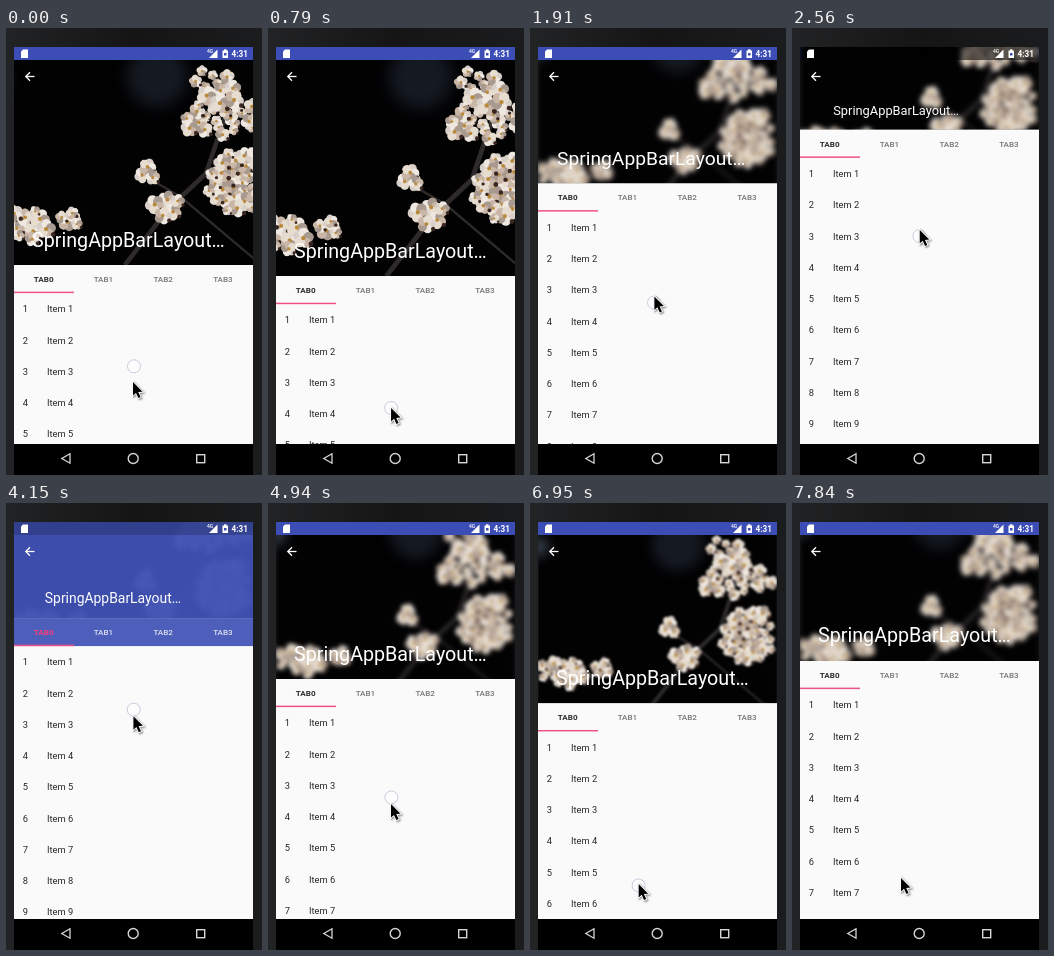
Animation of 256 by 447 pixels, one loop 8000 ms. Source, as an HTML page with a canvas:

```html
<!DOCTYPE html>
<html lang="en">
<head>
<meta charset="utf-8">
<title>Spring app bar</title>
<style>
  html, body { margin: 0; width: 100%; height: 100%; overflow: hidden; background: #111; }
  canvas { display: block; width: 256px; height: 447px; }
</style>
</head>
<body>
<canvas id="stage"></canvas>
<script>
const LOOP = 8000, RELEASE = 7520;
const LEFT = 8, RIGHT = 247, WIDTH = RIGHT - LEFT;
const STATUS_TOP = 19, BAR_TOP = 32, NAV_TOP = 416;
const REST = 158, COLLAPSED = 65.5;   // bottom edge of the header
const PHOTO_H = 177;
const BLUE = [60, 78, 182];

// Drag gestures: [time, header bottom] and [time, x, y]
const headerKeys = [[0, 237], [290, 249], [780, 249], [3000, COLLAPSED], [3690, COLLAPSED],
  [4550, REST], [4940, 176], [5900, 207], [6420, 207], [7220, 197]];
const pointerKeys = [[-60, 128, 338], [0, 127, 354], [290, 124, 380], [820, 123, 380], [1260, 121, 335],
  [3000, 130, 157], [3690, 130, 162], [4940, 123, 301], [5880, 108, 393], [6420, 108, 393], [7220, 109, 375]];

const clamp = v => Math.max(0, Math.min(1, v));
const lerp = (a, b, k) => a + (b - a) * k;
const progress = (t, start, length) => clamp((t - start) / length);
const easeOut = p => 1 - (1 - p) ** 2;
const mix = (a, b, k) => `rgb(${a.map((v, i) => Math.round(lerp(v, b[i], k))).join()})`;

function track(keys, t) {
  const i = keys.findIndex(key => key[0] > t);
  if (i < 0) return keys[keys.length - 1].slice(1);
  const from = keys[Math.max(0, i - 1)], to = keys[i];
  const k = progress(t, from[0], to[0] - from[0] || 1);
  return to.slice(1).map((v, n) => lerp(from[n + 1], v, k));
}

const headerBottom = t => lerp(track(headerKeys, t)[0], REST, easeOut(progress(t, RELEASE, 320)));
const scrimAlpha = t => easeOut(progress(t, 2570, 600)) * (1 - progress(t, 4020, 600) ** 2);

function randomizer(seed) {
  return () => (seed = seed * 16807 % 2147483647) / 2147483647;
}

const canvas = document.getElementById('stage');
const ctx = canvas.getContext('2d');
const dpr = window.devicePixelRatio || 1;
canvas.width = 256 * dpr;
canvas.height = 447 * dpr;

function box(color, x, y, w, h) {
  ctx.fillStyle = color;
  ctx.fillRect(x, y, w, h);
}

function disc(c, color, x, y, r) {
  c.fillStyle = color;
  c.beginPath();
  c.arc(x, y, r, 0, 7);
  c.fill();
}

function line(c, color, width, points, close) {
  c.strokeStyle = color;
  c.lineWidth = width;
  c.beginPath();
  points.forEach(([x, y]) => c.lineTo(x, y));
  if (close) c.closePath();
  c.stroke();
}

function shape(color, points) {
  ctx.fillStyle = color;
  ctx.beginPath();
  points.forEach(([x, y]) => ctx.lineTo(x, y));
  ctx.fill();
}

function label(text, x, y, size, color, weight = 400, align = 'left') {
  ctx.font = `${weight} ${size}px Roboto, sans-serif`;
  ctx.textAlign = align;
  ctx.fillStyle = color;
  ctx.fillText(text, x, y + size * 0.355);
}

function paintBlossom(c, x, y, r, random) {
  const petals = ['#d8cfc8', '#efe8e0', '#a99a90', '#c9b6a6', '#e6dccf'];
  const turn = random() * 6;
  petals.forEach((color, i) => {
    const a = turn + i * Math.PI * 0.4;
    disc(c, color, x + Math.cos(a) * r * 0.55, y + Math.sin(a) * r * 0.55, r * 0.55);
  });
  disc(c, '#b98a3c', x, y, r * 0.22);
  disc(c, '#3a2620', x + r * 0.8, y + r * 0.6, r * 0.25);
}

// Soft clusters of blossoms on black
function paintPhoto() {
  const photo = document.createElement('canvas');
  photo.width = WIDTH * 2;
  photo.height = PHOTO_H * 2;
  const c = photo.getContext('2d');
  const random = randomizer(77);
  c.scale(2, 2);
  c.fillStyle = '#020203';
  c.fillRect(0, 0, WIDTH, PHOTO_H);
  c.filter = 'blur(12px)';
  disc(c, '#151a22', 140, 14, 26);
  disc(c, '#3a4450', 0, 16, 10);
  c.filter = 'none';
  line(c, '#2e2a2a', 4, [[112, 177], [150, 128], [182, 98], [200, 45]]);
  line(c, '#2e2a2a', 2, [[122, 96], [160, 118], [230, 177]]);
  // x, y, half width, half height, count
  const clusters = [[187, 20, 20, 13, 9], [198, 50, 38, 16, 24], [210, 106, 27, 28, 32],
    [131, 97, 9, 6, 4], [148, 126, 13, 9, 7], [25, 142, 25, 14, 13], [66, 137, 9, 7, 5]];
  for (const [x, y, w, h, count] of clusters) {
    for (let i = 0; i < count; i++) {
      const a = i * 2.4, d = Math.sqrt((i + 0.5) / count);
      paintBlossom(c, x + Math.cos(a) * d * w, y + Math.sin(a) * d * h, 4 + random() * 4, random);
    }
  }
  return photo;
}
const photo = paintPhoto();

function drawFrame() {
  const shade = ctx.createLinearGradient(0, 0, 256, 0);
  shade.addColorStop(0, '#222324');
  shade.addColorStop(0.5, '#151516');
  shade.addColorStop(1, '#1b1c1d');
  box(shade, 0, 0, 256, 447);
}

function drawHeader(bottom, scrim) {
  const boxHeight = Math.max(bottom, REST) - BAR_TOP;
  const scale = Math.max(1, boxHeight / PHOTO_H);
  const w = WIDTH * scale, h = PHOTO_H * scale;
  const shift = Math.max(0, REST - bottom) * 0.6;
  const underStatus = clamp((150 - bottom) / 40);
  const blur = Math.sqrt(clamp((210 - bottom) / 52)) * 2.5;

  box(`rgb(${BLUE})`, LEFT, STATUS_TOP, WIDTH, BAR_TOP - STATUS_TOP);
  ctx.save();
  ctx.beginPath();
  const top = underStatus ? STATUS_TOP : BAR_TOP;
  ctx.rect(LEFT, top, WIDTH, bottom - top);
  ctx.clip();
  if (blur) ctx.filter = `blur(${blur * dpr}px)`;
  ctx.drawImage(photo, LEFT + (WIDTH - w) / 2, BAR_TOP + (boxHeight - h) / 2 - shift, w, h);
  ctx.filter = 'none';
  box(`rgba(63,81,181,${scrim})`, LEFT, top, WIDTH, bottom - top);
  ctx.restore();
  if (underStatus) {
    box(`rgba(${BLUE},${1 - underStatus})`, LEFT, STATUS_TOP, WIDTH, BAR_TOP - STATUS_TOP);
    box(`rgba(0,0,0,${underStatus * lerp(0.55, 0.2, scrim)})`, LEFT, STATUS_TOP, WIDTH, BAR_TOP - STATUS_TOP);
  }

  line(ctx, '#fff', 1.3, [[28.5, 48.5], [20, 48.5]]);
  line(ctx, '#fff', 1.3, [[24, 44.3], [19.8, 48.5], [24, 52.7]]);

  const f = 1 - clamp((bottom - COLLAPSED) / (REST - COLLAPSED)) ** 2;
  label('SpringAppBarLayout…', lerp(26, 44, f), bottom - lerp(25.5, 18, f), 19.7 * lerp(1, 0.588, f), '#fff');
}

function drawStatusIcons() {
  shape('#fff', [[17, 21.5], [22, 21.5], [22, 30], [15, 30], [15, 23.5]]);
  label('4G', 201, 23.5, 5, '#fff', 500);
  shape('#fff', [[211.5, 21.5], [211.5, 30], [203, 30]]);
  box('#fff', 216.5, 22.5, 5.5, 7.5);
  box('#fff', 218, 21.3, 2.5, 2);
  box(`rgb(${BLUE})`, 218, 25, 2.5, 2.5);
  label('4:31', 242, 26, 8.2, '#fff', 700, 'right');
}

function drawContent(bottom, scrim) {
  ctx.save();
  ctx.beginPath();
  ctx.rect(LEFT, BAR_TOP, WIDTH, NAV_TOP - BAR_TOP);
  ctx.clip();
  box('#fafafa', LEFT, bottom, WIDTH, NAV_TOP - bottom);
  box(mix([250, 250, 250], [69, 87, 184], scrim), LEFT, bottom, WIDTH, 28);
  for (let i = 0; i < 4; i++) {
    const color = i ? mix([117, 117, 117], [226, 229, 245], scrim) : mix([45, 45, 45], [255, 64, 129], scrim);
    label('TAB' + i, 37.7 + i * 59.75, bottom + 14, 8.1, color, i ? 500 : 700, 'center');
  }
  box('#f0508a', LEFT, bottom + 26.6, 60, 1.5);
  for (let i = 1; i <= 12; i++) {
    const y = bottom + 44 + (i - 1) * 31.25;
    label(i, 16.7, y, 9.3, '#262626');
    label('Item ' + i, 41, y, 9.3, '#262626');
  }
  ctx.restore();
}

function drawNavigation() {
  box('#000', LEFT, NAV_TOP, WIDTH, 447 - NAV_TOP);
  line(ctx, '#d6d6d6', 1.3, [[64, 425.8], [55.8, 430.5], [64, 435.2]], true);
  ctx.lineWidth = 1.4;
  ctx.beginPath();
  ctx.arc(127.2, 430.5, 5, 0, 7);
  ctx.stroke();
  ctx.strokeRect(190.7, 426.7, 8, 8);
}

function drawTouch(x, y) {
  ctx.beginPath();
  ctx.arc(x, y, 6.5, 0, 7);
  ctx.fillStyle = 'rgba(255,255,255,.5)';
  ctx.fill();
  ctx.strokeStyle = 'rgba(175,178,205,.65)';
  ctx.lineWidth = 1;
  ctx.stroke();
}

function drawCursor(x, y) {
  const arrow = [[0, 0], [0, 13.5], [3, 10.8], [5.4, 16], [7.6, 15], [5.2, 10], [9.5, 9.6]];
  ctx.save();
  ctx.translate(x, y);
  ctx.shadowColor = 'rgba(0,0,0,.5)';
  ctx.shadowBlur = 2 * dpr;
  ctx.shadowOffsetX = ctx.shadowOffsetY = dpr;
  line(ctx, '#fff', 1.8, arrow, true);
  ctx.shadowColor = 'transparent';
  shape('#000', arrow);
  ctx.restore();
}

function render(t) {
  const bottom = headerBottom(t), scrim = scrimAlpha(t);
  ctx.setTransform(dpr, 0, 0, dpr, 0, 0);
  drawFrame();
  drawHeader(bottom, scrim);
  drawStatusIcons();
  drawContent(bottom, scrim);
  drawNavigation();
  if (t < RELEASE) drawTouch(...track(pointerKeys, t - 60));
  drawCursor(...track(pointerKeys, t));
}

const start = performance.now();
function tick() {
  render((performance.now() - start) % LOOP);
  requestAnimationFrame(tick);
}
tick();
</script>
</body>
</html>
```
